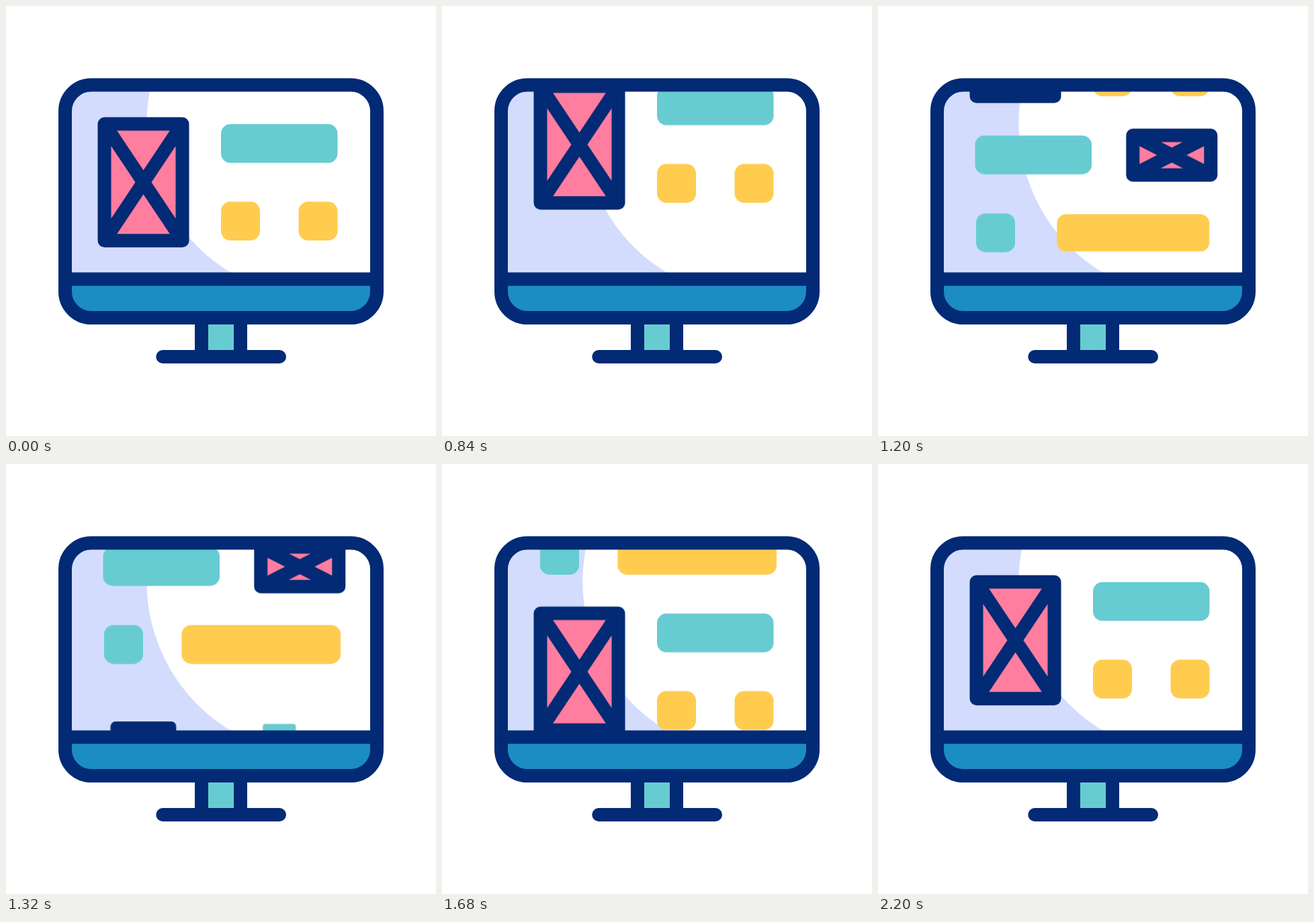
Recreate the animation shown at these times as an HTML page. Size 640 by 640 pixels, loop 2.64 s.

```html
<!DOCTYPE html>
<html lang="en">
<head>
<meta charset="utf-8">
<title>Scrolling page on a monitor</title>
<style>
  :root {
    --t: 0;
    --navy: #032a75;
    --teal: #67ccd1;
    --yellow: #ffcc50;
    --ease: cubic-bezier(.605, 0, .395, 1);
  }
  html, body { margin: 0; width: 100%; height: 100%; overflow: hidden; background: #fff; }
  svg { display: block; width: 100vw; height: 100vh; }

  .line { fill: none; stroke: var(--navy); stroke-width: 20; stroke-linecap: round; stroke-linejoin: round; }
  .card { fill: #ff7d9f; stroke: var(--navy); stroke-width: 20; stroke-linejoin: round; }
  .teal { fill: var(--teal); }
  .yellow { fill: var(--yellow); }

  /* Paused animations are positioned by the clock through their delay. */
  .scroll {
    --way: -480px;
    animation: scroll 1920ms var(--ease) calc((280 - var(--t)) * 1ms) both paused;
  }
  .middle { --way: -443px; }
  .pop {
    transform-box: fill-box;
    transform-origin: center;
    animation: pop 320ms var(--ease) calc((var(--at) - var(--t)) * 1ms) both paused;
  }
  @keyframes scroll { from { transform: translateY(0); } to { transform: translateY(var(--way)); } }
  @keyframes pop { from { transform: scale(0); } to { transform: scale(1); } }
</style>
</head>
<body>
<svg viewBox="0 0 640 640">
  <defs>
    <clipPath id="screen"><rect x="90" y="118" width="460" height="288"/></clipPath>
    <clipPath id="body"><rect x="88" y="117.5" width="464" height="346.5" rx="39"/></clipPath>
    <path id="tall" class="card" d="M146.5 175.5H262.5V349.3H146.5ZL262.5 349.3M262.5 175.5L146.5 349.3"/>
    <rect id="bar" class="teal" x="320" y="175.8" width="173.5" height="57.7" rx="14"/>
    <rect id="left" class="yellow" x="320" y="291.3" width="58" height="57.7" rx="14"/>
    <rect id="right" class="yellow" x="435.5" y="291.3" width="58" height="57.7" rx="14"/>
  </defs>

  <g clip-path="url(#body)">
    <path fill="#d3dcfd" d="M88 117V407H353A259 259 0 0 1 216 117Z"/>
    <rect x="88" y="406" width="464" height="58" fill="#1b8dc3"/>
  </g>

  <g clip-path="url(#screen)">
    <g class="scroll">
      <use href="#tall"/>
      <use href="#bar"/>
      <use href="#left"/>
      <use href="#right"/>
    </g>

    <g class="scroll middle">
      <rect class="pop teal" style="--at: 820" x="144.5" y="391" width="173.5" height="57.7" rx="14"/>
      <path class="pop card" style="--at: 820" d="M379.3 390.7H495.3V449.7H379.3ZL495.3 449.7M495.3 390.7L379.3 449.7"/>
      <rect class="pop teal" style="--at: 880" x="146" y="507" width="58" height="57.7" rx="14"/>
      <rect class="pop yellow" style="--at: 940" x="261.5" y="507" width="236.5" height="57.7" rx="14"/>
    </g>

    <g class="scroll">
      <g transform="translate(0 480)">
        <g class="pop" style="--at: 1130"><use href="#tall"/></g>
        <g class="pop" style="--at: 1190"><use href="#bar"/></g>
        <g class="pop" style="--at: 1250"><use href="#left"/></g>
        <g class="pop" style="--at: 1310"><use href="#right"/></g>
      </g>
    </g>
  </g>

  <rect class="teal" x="291" y="464" width="58" height="58"/>
  <path class="line" d="M291 464V522M349 464V522M233.3 522H407"/>
  <rect class="line" x="88" y="117.5" width="464" height="346.5" rx="39"/>
  <path class="line" d="M88 406.5H552"/>
</svg>
<script>
  const LOOP = 2640, STEP = 40;
  const root = document.documentElement;
  const start = performance.now();

  function draw() {
    const t = (performance.now() - start) % LOOP;
    root.style.setProperty('--t', Math.floor(t / STEP) * STEP);
    requestAnimationFrame(draw);
  }
  draw();
</script>
</body>
</html>
```
